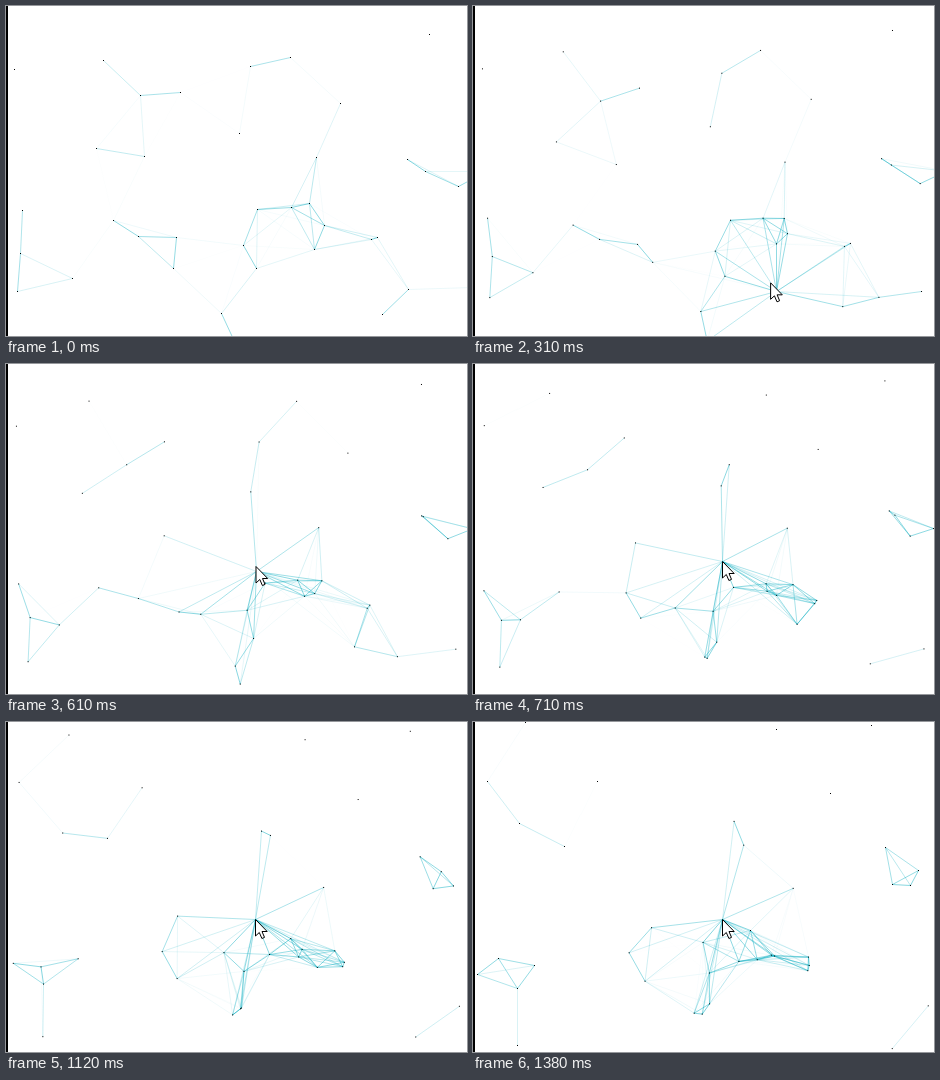
An HTML page with a canvas that plays this animation: 461 by 330 pixels, repeating every 1.4 s.

```html
<!DOCTYPE html>
<html lang="en">
<head>
<meta charset="utf-8">
<title>Particle web</title>
<style>
  html, body { margin: 0; overflow: hidden; background: #fff; }
  canvas { display: block; }
</style>
</head>
<body>
<canvas id="stage" width="461" height="330"></canvas>
<script>
const ctx = document.getElementById('stage').getContext('2d');
const LOOP = 1400;
const STEPS = 56;
const ENTRY = 4;                          // step at which the pointer appears
const LINK = 6000, POINTER_LINK = 20000;  // squared reach of a link
const PULL = .03;

// Each particle: start x, start y, and its drift over the whole loop.
const regions = {
  left: [
    [8, 63, 6, -4], [97, 54, -45, -54], [134, 89, -43, 35], [174, 86, -50, -27],
    [90, 142, -44, -41], [138, 150, 30, 50], [107, 214, -46, 29],
    [132, 230, -37, 18], [170, 231, -37, 43], [167, 262, 52, -44],
    [16, 204, -12, 48], [14, 247, 30, 19], [66, 272, -41, -36], [11, 285, 33, 38]
  ],
  centre: [
    [233, 127, 24, -42], [244, 60, 27, 42], [284, 51, 19, -44], [334, 97, 23, -26],
    [310, 151, 11, 4], [251, 203, 10, 30], [285, 201, 10, 25], [303, 197, 29, 27],
    [318, 219, -36, 12], [308, 243, -31, -35], [237, 239, -7, 7],
    [250, 262, -27, 26], [215, 307, 9, -21], [228, 335, -27, 5]
  ],
  right: [
    [423, 28, -25, -25], [401, 153, 44, -5], [419, 165, -7, -40],
    [452, 180, -33, -18], [480, 165, -43, -2], [371, 231, 37, 37],
    [365, 233, 37, 43], [402, 283, 41, 50], [376, 308, -42, -49], [466, 281, 8, -2]
  ]
};

const lerp = (a, b, mix) => a + (b - a) * mix;

// The pointer sweeps in from below and comes to rest: step, x, y.
const route = [[ENTRY, 350, 330], [9, 303, 285], [18, 250, 207], [20, 249, 197]];
function pointerAt(step) {
  const next = Math.max(1, route.findIndex(stop => stop[0] > step));
  const end = step >= 20 ? route.length - 1 : next;
  const [s0, x0, y0] = route[end - 1], [s1, x1, y1] = route[end];
  const mix = Math.min(1, (step - s0) / (s1 - s0));
  return { x: lerp(x0, x1, mix), y: lerp(y0, y1, mix) };
}

const distance2 = (a, b) => (a.x - b.x) ** 2 + (a.y - b.y) ** 2;

// Drift one step; particles in the outer ring of the pointer's reach are drawn in.
function advance({ x, y, vx, vy }, step) {
  const moved = { x: x + vx, y: y + vy, vx, vy };
  if (step < ENTRY) return moved;
  const hub = pointerAt(step), gap = distance2(moved, hub);
  if (gap >= POINTER_LINK / 2 && gap < POINTER_LINK) {
    moved.x = lerp(moved.x, hub.x, PULL);
    moved.y = lerp(moved.y, hub.y, PULL);
  }
  return moved;
}

const history = [Object.values(regions).flat().map(([x, y, dx, dy]) =>
  ({ x, y, vx: dx / STEPS, vy: dy / STEPS }))];
for (let step = 1; step <= STEPS; step++) {
  history.push(history[step - 1].map(p => advance(p, step)));
}

// Steady start, a short rush, then a gentle acceleration.
function stepAt(time) {
  if (time < 610) return 18 * time / 610;
  if (time < 710) return lerp(18, 26, (time - 610) / 100);
  return lerp(26, STEPS, Math.min(1, (time - 710) / 670) ** 1.2);
}

function drawLink(a, b, reach) {
  const strength = 1 - distance2(a, b) / reach;
  if (strength <= 0) return;
  ctx.lineWidth = strength / 2;
  ctx.strokeStyle = `rgba(0, 170, 190, ${Math.min(1, strength + .2)})`;
  ctx.beginPath();
  ctx.moveTo(a.x, a.y);
  ctx.lineTo(b.x, b.y);
  ctx.stroke();
}

const arrow = new Path2D('M0 0V16.5L3.8 13L6.4 19L9 17.9L6.5 12H11.7Z');
function drawCursor({ x, y }) {
  ctx.save();
  ctx.translate(x, y);
  ctx.fillStyle = '#fff';
  ctx.strokeStyle = '#000';
  ctx.lineWidth = 1;
  ctx.fill(arrow);
  ctx.stroke(arrow);
  ctx.restore();
}

function draw(time) {
  const step = Math.round(stepAt(time));
  const points = history[step];

  ctx.fillStyle = '#fff';
  ctx.fillRect(0, 0, 461, 330);
  ctx.save();
  ctx.translate(.5, .5);
  points.forEach((a, i) => {
    for (const b of points.slice(i + 1)) drawLink(a, b, LINK);
  });
  if (step >= ENTRY) {
    for (const p of points) drawLink(p, pointerAt(step), POINTER_LINK);
  }
  ctx.fillStyle = '#000';
  for (const { x, y } of points) ctx.fillRect(x - .5, y - .5, 1, 1);
  // Links trail the cursor by one step.
  if (step >= ENTRY) drawCursor(pointerAt(step + 1));
  ctx.restore();

  ctx.fillStyle = '#000';
  ctx.fillRect(0, 0, 2, 330);
}

const start = performance.now();
function tick() {
  draw((performance.now() - start) % LOOP);
  requestAnimationFrame(tick);
}
tick();
</script>
</body>
</html>
```
